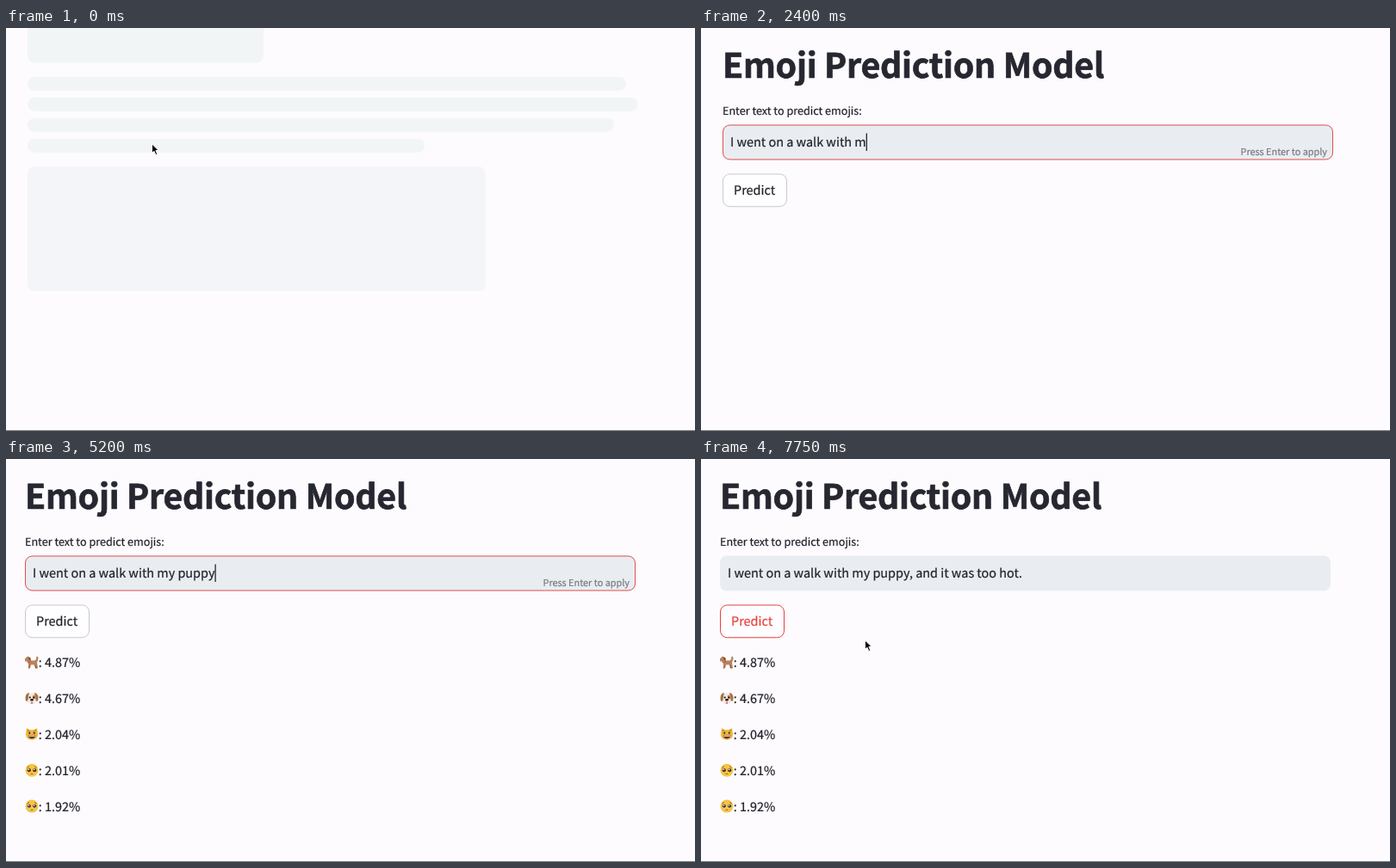
An HTML page that plays this animation: 800x469 px, repeating every 8 s.

```html
<!DOCTYPE html>
<html lang="en">
<head>
<meta charset="utf-8">
<title>Emoji Prediction Model</title>
<style>
  html, body { margin: 0; width: 100%; height: 100%; overflow: hidden; background: #fdfbfe; }
  svg { display: block; }
  text {
    font: 14.43px "Noto Sans CJK SC", "Noto Sans CJK JP", "Noto Sans CJK", "Open Sans", sans-serif;
    fill: currentColor; stroke: currentColor; stroke-width: .2px;
    color: #20212a; white-space: pre; text-rendering: geometricPrecision;
  }
  #title { font-size: 39.3px; font-weight: 700; letter-spacing: -.25px; stroke-width: .7px; color: #262730; }
  #label { font-size: 12.62px; }
  #hint { font-size: 10.87px; color: #777a81; text-anchor: end; }
</style>
</head>
<body>
<svg width="800" height="469" viewBox="0 0 800 469">
  <defs>
    <g id="dog">
      <path d="M0 4L3 1 6 3 7 6H11Q14 5 13 2 15 0 15.500 3 15.500 6 14 8L15 15H13L11 11H7L6 15H4V10L2 7H0Z" fill="#b9835c"/>
      <path d="M4 2L6.500 3V6L4.500 5ZM11 10L14 15H12ZM6 11L5 15H4Z" fill="#7c4a30"/>
      <path d="M4 8L7 7" stroke="#d64b3d"/>
    </g>
    <g id="puppy">
      <ellipse cx="8" cy="8.500" rx="6" ry="6.500" fill="#f0e9e2"/>
      <path id="ear" d="M5 1.500Q1 2 .5 7 .5 12 2.500 11.500 4 10 4 6Z" fill="#a8713f"/>
      <use href="#ear" transform="matrix(-1 0 0 1 16 0)"/>
      <ellipse cx="10.600" cy="6.500" rx="2" ry="2.500" fill="#c99460"/>
      <circle cx="5.700" cy="7" r="1"/><circle cx="10.300" cy="7" r="1"/>
      <ellipse cx="8" cy="9.800" rx="1.800" ry="1.200"/>
      <path d="M7 12H9V14.500H7Z" fill="#e4788a"/>
    </g>
    <g id="cat">
      <path d="M2 1L6 3H10L14 1 15 8Q15 14.500 8 14.500T1 8Z" fill="#eeb638"/>
      <path d="M2.800 2.500L5 3.500 3.300 5.500ZM13.200 2.500L11 3.500 12.700 5.500Z" fill="#c77b45"/>
      <ellipse cx="5.300" cy="6.500" rx=".9" ry="1.400" fill="#3b2a18"/>
      <ellipse cx="10.700" cy="6.500" rx=".9" ry="1.400" fill="#3b2a18"/>
      <path d="M3.800 9.300H12.200Q11.500 13.300 8 13.300T3.800 9.300Z" fill="#60351f"/>
      <path d="M4.500 9.500H11.500V10.500H4.500Z" fill="#fff"/>
    </g>
    <g id="pleading">
      <circle cx="8" cy="8" r="7.500" fill="#f6c445"/>
      <g id="eye">
        <circle cx="4.800" cy="8" r="2.100" fill="#4b3022"/>
        <circle cx="4.300" cy="7.200" r=".8" fill="#fff"/>
      </g>
      <use href="#eye" x="6.400"/>
      <path d="M2.500 5L5 3.500M13.500 5L11 3.500M6.700 12.500Q8 11.500 9.300 12.500" fill="none" stroke="#87552a" stroke-width=".9"/>
    </g>
    <g id="tearful">
      <use href="#pleading"/>
      <path d="M3 9.500Q5 11 7 9.500M9 9.500Q11 11 13 9.500" fill="none" stroke="#a8d8f0"/>
    </g>
  </defs>

  <g id="skeleton" fill="#f2f5f6">
    <rect x="25" y="-20" width="274" height="60.500" rx="8"/>
    <g id="bars"></g>
    <rect x="25" y="161.500" width="531.500" height="144.500" rx="7" fill="#f3f5f8"/>
  </g>

  <g id="page">
    <text id="title" x="25" y="58.200">Emoji Prediction Model</text>
    <text id="label" x="25" y="101.300">Enter text to predict emojis:</text>
    <rect x="25" y="112.500" width="709" height="41" rx="8" fill="#e9edf1"/>
    <rect id="focus" x="25.500" y="113" width="708" height="40" rx="8" fill="none" stroke="#e2504d"/>
    <text id="typed" x="34" y="138.200"></text>
    <rect id="caret" y="122.500" width="1.300" height="20.500" fill="#262730"/>
    <text id="hint" x="727" y="147.600">Press Enter to apply</text>
    <rect id="button" x="25.500" y="170" width="74" height="37.800" rx="8"/>
    <text id="buttonText" x="38" y="194.200">Predict</text>
    <g id="results"></g>
  </g>

  <rect y="468" width="800" height="1" fill="#77777b"/>

  <g id="pointer">
    <path id="arrow" d="M0 0V10.500L2.500 8.300 4.300 12.500 6.200 11.700 4.400 7.500H7.600Z" stroke="#fff" stroke-width=".9"/>
    <path id="beam" d="M-2-7Q0-7 0-5.500Q0-7 2-7M0-5.500V5.500M-2 7Q0 7 0 5.500Q0 7 2 7" fill="none" stroke="#333"/>
    <path id="hand" d="M-1 0Q0-1 1 0V4L5.500 5Q7 5.500 7 7L6 11V13H0V11L-3 7.500Q-3 5.500-1 7Z" fill="#fff" stroke="#222" stroke-width=".9"/>
  </g>
</svg>
<script>
const LOOP = 8000, STEP = 50, LOADED = 450, PREDICTED = 4300, EDITED = 5150;
const FIRST = "I went on a walk with my puppy.";
const SECOND = "I went on a walk with my puppy, and it was too hot.";
const RED = "#e8403e", PRESSED = "#ff4043";

// Each round: click the input, type, press Enter, press the button.
const rounds = [
  { click: 750, edit: 980, enter: 3400, press: 3600 },
  { click: 4700, edit: EDITED, enter: 6850, press: 7300 },
];
const bursts = [
  { at: 980, keys: 26, gap: 64 },
  { at: 2850, keys: 5, gap: 85 },
  { at: 5300, keys: 6, gap: 95 },
  { at: 5950, keys: 15, gap: 56 },
];
const home = { x: 169.5, y: 135 }, button = { x: 80, y: 195.5 }, field = { x: 246, y: 133 };
const moves = [
  { at: 3400, to: button },
  { at: 3800, to: { x: 200, y: 46 } },
  { at: 4350, to: field },
  { at: 6950, to: button },
  { at: 7480, to: { x: 190.5, y: 211 } },
];
const scores = { dog: "4.87", puppy: "4.67", cat: "2.04", pleading: "2.01", tearful: "1.92" };

const $ = id => document.getElementById(id);
const show = (id, on) => { $(id).style.display = on ? "" : "none"; };
const clamp = (v, low, high) => Math.min(high, Math.max(low, v));
const ramp = (t, from, length) => clamp((t - from) / length, 0, 1);
const during = (t, from, to) => t >= from && t < to;
const ease = k => k * k * (3 - 2 * k);

$("bars").innerHTML = [695, 709, 681, 461].map((width, i) =>
  `<rect x="25" y="${57 + i * 24}" width="${width}" height="15.700" rx="7.800"/>`).join("");

$("results").innerHTML = Object.entries(scores).map(([icon, score], i) => {
  const y = 237 + i * 41.9;
  return `<use href="#${icon}" x="25" y="${y - 8.5}"/><text x="40.700" y="${y + 5.1}">: ${score}%</text>`;
}).join("");

function typedCount(t) {
  const keys = bursts.reduce((sum, b) => sum + clamp(Math.floor((t - b.at) / b.gap) + 1, 0, b.keys), 0);
  return t < EDITED ? keys : keys - 1;
}

function drawInput(t) {
  const count = typedCount(t), typed = $("typed");
  typed.textContent = (t < EDITED ? FIRST : SECOND).slice(0, count);
  $("caret").setAttribute("x", 34 + (count ? typed.getComputedTextLength() : 0));
  const focus = rounds.reduce((sum, r) => sum + ramp(t, r.click, 150) - ramp(t, r.press - 50, 200), 0);
  $("focus").setAttribute("stroke-opacity", focus);
  show("caret", rounds.some(r => during(t, r.click + 50, r.press - 50)));
  show("hint", rounds.some(r => during(t, r.edit, r.enter)));
}

function drawButton(t) {
  const pressed = rounds.some(r => during(t, r.press, r.press + 150));
  const outlined = during(t, rounds[0].press - 50, rounds[1].click) || t >= rounds[1].press - 100;
  $("button").setAttribute("fill", pressed ? PRESSED : "#fefdff");
  $("button").setAttribute("stroke", pressed ? PRESSED : outlined ? RED : "#c9c8cf");
  $("buttonText").style.color = pressed ? "#fff" : outlined ? RED : "";
}

function drawPointer(t, left) {
  let { x, y } = home;
  for (const { at, to } of moves) {
    const k = ease(ramp(t, at, 250));
    x += (to.x - x) * k;
    y += (to.y - y) * k;
  }
  const over = (width, top, bottom) =>
    t >= LOADED && during(x, left, left + width) && during(y, top, bottom);
  const kind = over(74, 170, 208) ? "hand" : over(709, 113, 153) ? "beam" : "arrow";
  for (const id of ["arrow", "beam", "hand"]) show(id, id === kind);
  $("pointer").setAttribute("transform", `translate(${x} ${y})`);
  show("pointer", !rounds.some(r => during(t, r.edit, r.enter)));
}

function draw(now) {
  const t = Math.floor(now % LOOP / STEP) * STEP;
  const left = t < PREDICTED ? 25 : 22;
  show("skeleton", t < LOADED);
  show("page", t >= LOADED);
  show("results", t >= PREDICTED);
  $("page").setAttribute("transform", `translate(${left - 25} 0)`);
  drawInput(t);
  drawButton(t);
  drawPointer(t, left);
}

const start = performance.now();
function tick() {
  draw(performance.now() - start);
  requestAnimationFrame(tick);
}
tick();
</script>
</body>
</html>
```
